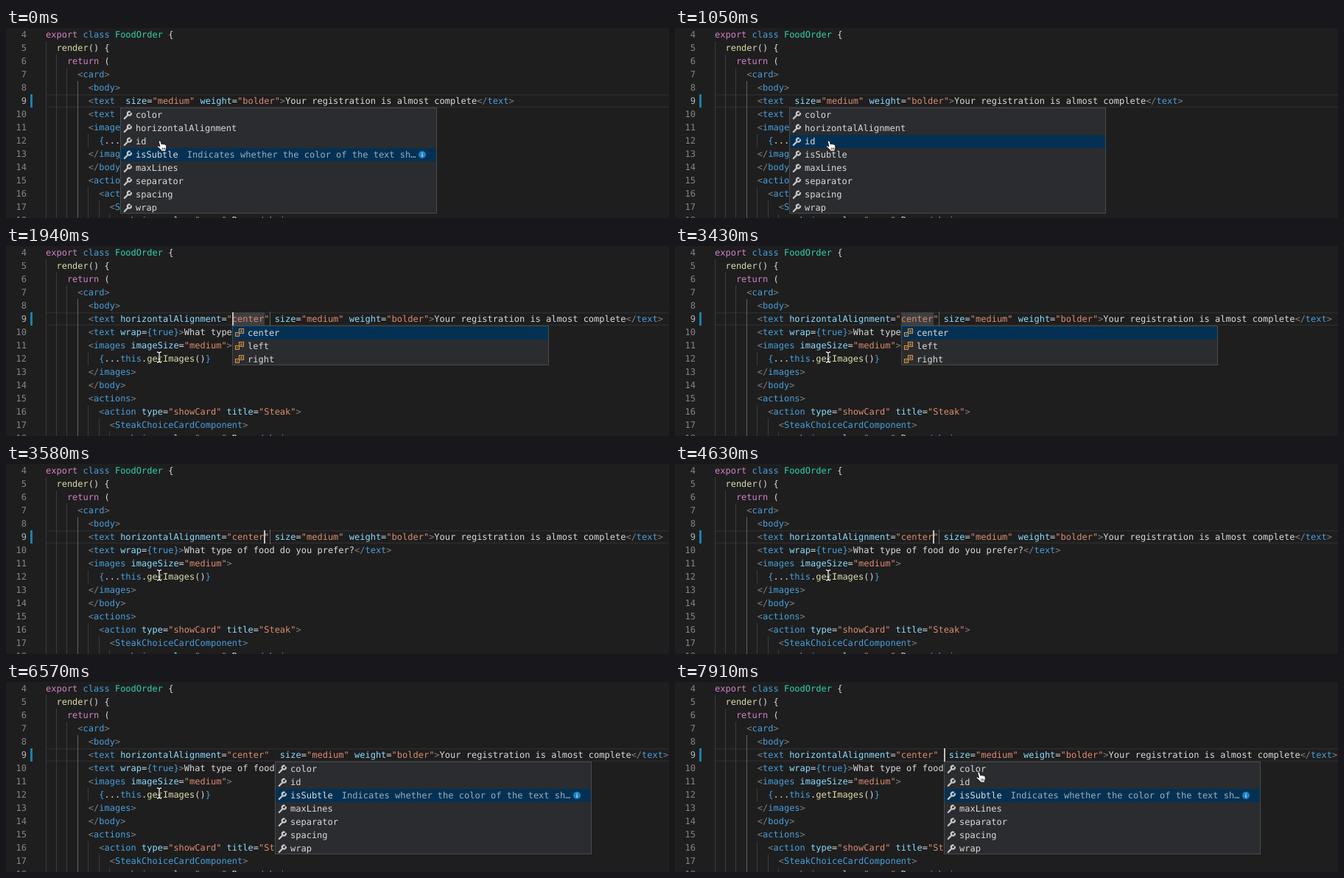
Animation, 900 px wide and 258 px high, one loop 8 s. Source, as an HTML page with a canvas:

```html
<!DOCTYPE html>
<html lang="en">
<head>
<meta charset="utf-8">
<title>Editor completion</title>
<style>
html, body { margin: 0; width: 100%; height: 100%; overflow: hidden; background: #1e1e1e; }
canvas { display: block; }
</style>
</head>
<body>
<canvas id="stage" width="900" height="258"></canvas>
<script>
const ctx = document.getElementById('stage').getContext('2d');
const LOOP = 8000, ROW = 18, LEFT = 54, CELL = 12 * 0.602;
const TEXT = '#dadada', GREY = '#808080', BLUE = '#489fdc';

const RULES = [
  [/\b(export|return)\b/, '#d081c8'],
  [/\bclass\b|\bthis\b|\btrue\b|\{(?=true|\.)|(?<=true|\(\))\}/, BLUE],
  [/FoodOrder/, '#2fd0ae'],
  [/\w+(?=\()/, '#dcdcaa'],
  [/<\/?|>/, GREY],
  [/(?<=<\/?)\w+/, BLUE],
  [/\w+(?==)/, '#8cdcfe'],
  [/"[^"]*"/, '#dd8b70']
];
const LEXER = new RegExp(RULES.map(([r], i) => `(?<r${i}>${r.source})`).join('|'), 'g');

const FIRST_LINE = 4, EDIT_LINE = 9;
const CODE = [
  [0, 'export class FoodOrder {'],
  [1, 'render() {'],
  [2, 'return ('],
  [3, '<card>'],
  [4, '<body>'],
  [4, ''],
  [4, '<text wrap={true}>What type of food do you prefer?</text>'],
  [4, '<images imageSize="medium">'],
  [5, '{...this.getImages()}'],
  [4, '</images>'],
  [4, '</body>'],
  [4, '<actions>'],
  [5, '<action type="showCard" title="Steak">'],
  [6, '<SteakChoiceCardComponent>'],
  [7, '<choice value="rare">Rare</choice>']
];

const SUBTLE = 'Indicates whether the color of the text sh…';
const ALIGN = 'Controls how Items are horizont…';
const PROPS = ['color', 'horizontalAlignment', 'id', 'isSubtle', 'maxLines', 'separator', 'spacing', 'wrap'];
const PROPS_LEFT = PROPS.filter(name => name !== 'horizontalAlignment');

// Step tables: the last entry whose time has passed applies.
const EDITS = [[0, ''], [1940, 'horizontalAlignment="center"'], [5670, 'horizontalAlignment="center" ']];
const POPUPS = [
  [0, { x: 155, items: PROPS, pick: 3, detail: SUBTLE }],
  [1050, { x: 155, items: PROPS, pick: 2 }],
  [1200, { x: 155, items: PROPS, pick: 1, detail: ALIGN }],
  [1940, { x: 307, items: ['center', 'left', 'right'], pick: 0, values: true }],
  [3580, null],
  [6570, { x: 365, items: PROPS_LEFT, pick: 2, detail: SUBTLE }]
];
const CARETS = [
  [0, 0], [300, 155], [750, 0], [1350, 155], [1790, 0],
  [1940, 307], [2390, 0], [2830, 307], [3430, 0],
  [3580, 350], [4030, 0], [4630, 350], [5080, 358], [5520, 0],
  [5670, 365], [6120, 0], [6720, 365], [7170, 0], [7760, 365]
];
const POINTERS = [
  [0, { x: 208, y: 152, hand: true }],
  [1940, { x: 208, y: 151 }],
  [7320, { x: 219, y: 163 }],
  [7470, { x: 262, y: 169 }],
  [7620, { x: 338, y: 158 }],
  [7760, { x: 394, y: 134, hand: true }],
  [7910, { x: 411.5, y: 121, hand: true }]
];

const at = (steps, t) => steps.findLast(([start]) => t >= start)[1];
const baseline = line => 13 + (line - FIRST_LINE) * ROW;

function rect(x, y, w, h, color) {
  ctx.fillStyle = color;
  ctx.fillRect(x, y, w, h);
}

function write(text, x, y, color) {
  ctx.fillStyle = color;
  ctx.fillText(text, x, y);
}

function stroke(path, color, width) {
  ctx.strokeStyle = color;
  ctx.lineWidth = width;
  ctx.stroke(path);
}

function drawCode(text, x, y) {
  let done = 0;
  const put = (part, start, color) => write(part, x + start * CELL, y, color);
  for (const m of text.matchAll(LEXER)) {
    put(text.slice(done, m.index), done, TEXT);
    const rule = RULES.findIndex((_, i) => m.groups['r' + i] !== undefined);
    put(m[0], m.index, RULES[rule][1]);
    done = m.index + m[0].length;
  }
  put(text.slice(done), done, TEXT);
}

function drawEditor(t) {
  rect(0, 0, 900, 258, '#1e1e1e');
  rect(LEFT, 90, 846, 1.5, '#2b2b2b');
  rect(LEFT, 106.5, 846, 1.5, '#2b2b2b');
  rect(33, 90, 3, ROW, '#1b81a8');
  if (t >= 1940 && t < 3580) rect(307, 90, 44, ROW, '#3d3f42');
  if (t >= 1940 && t < 5080) rect(358, 89, 1, 20, '#626262');

  CODE.forEach(([depth, text], i) => {
    const line = FIRST_LINE + i, y = baseline(line);
    for (let d = 0; d < depth; d++) {
      rect(Math.floor(LEFT + d * 2 * CELL), i * ROW, 1, ROW, d === 3 ? '#626262' : '#3c3c3c');
    }
    const label = String(line);
    write(label, 28 - label.length * CELL, y, line === EDIT_LINE ? '#b4b4b4' : '#858585');
    if (line === EDIT_LINE) {
      text = `<text ${at(EDITS, t)} size="medium" weight="bolder">Your registration is almost complete</text>`;
    }
    drawCode(text, LEFT + depth * 2 * CELL, y);
  });
  const caret = at(CARETS, t);
  if (caret) rect(caret, 90, 2, ROW, '#c0c0be');
}

function drawWrench(x, y) {
  const shape = new Path2D();
  shape.moveTo(x + 1.8, y + 11);
  shape.lineTo(x + 6.4, y + 6.2);
  shape.arc(x + 8.4, y + 4.2, 2.5, Math.PI * 0.75, Math.PI * 1.55);
  shape.moveTo(x + 6.4, y + 6.2);
  shape.arc(x + 8.4, y + 4.2, 2.5, Math.PI * 0.75, -Math.PI * 0.05, true);
  ctx.lineCap = 'round';
  stroke(shape, '#c8c8c8', 2.3);
  ctx.lineCap = 'butt';
}

function drawValueIcon(x, y) {
  const shape = new Path2D();
  shape.rect(x + 5.5, y + 0.5, 6, 6);
  shape.rect(x + 0.5, y + 5.5, 5, 5);
  shape.moveTo(x + 7, y + 2.7);
  shape.lineTo(x + 10, y + 2.7);
  shape.moveTo(x + 7, y + 4.5);
  shape.lineTo(x + 10, y + 4.5);
  shape.moveTo(x + 2, y + 8);
  shape.lineTo(x + 4, y + 8);
  stroke(shape, '#dc9746', 1.1);
}

function drawInfo(x, y) {
  ctx.fillStyle = '#1c83c4';
  ctx.beginPath();
  ctx.arc(x, y, 5, 0, Math.PI * 2);
  ctx.fill();
  rect(x - 0.6, y - 3, 1.2, 1.3, '#d5e8f4');
  rect(x - 0.6, y - 0.8, 1.2, 3.8, '#d5e8f4');
}

function drawPopup({ x, items, pick, detail, values }) {
  const width = 430, height = items.length * ROW;
  rect(x, 108, width, height, '#2b2c2f');
  items.forEach((name, i) => {
    const top = 109 + i * ROW, y = top + 13;
    if (i === pick) rect(x + 1, top, width - 2, ROW, '#043153');
    if (values) drawValueIcon(x + 4, top + 3);
    else drawWrench(x + 4, top + 3);
    write(name, x + 21, y, TEXT);
    if (i === pick && detail) {
      write(detail, x + 33 + name.length * CELL, y, '#9badbb');
      drawInfo(x + 410, top + 9);
    }
  });
  ctx.strokeStyle = '#4a4a4a';
  ctx.lineWidth = 1;
  ctx.strokeRect(x + 0.5, 108.5, width - 1, height - 1);
}

const HAND = new Path2D(`M2.2 1.8 Q3.8 .2 5 1.9 L6.2 6 Q7.4 4.8 8.4 6 Q9.6 5 10.5 6.4
  Q12 5.7 12.4 7.3 Q13.5 10.6 12.2 12.8 L11.8 15.2 L6.4 15.2 Q5.5 13 1 9.8
  Q-.2 8.2 1.5 7.8 L4 9 Z`);
const FINGERS = new Path2D('M7.2 10.5 V13.3 M8.9 10.5 V13.3 M10.6 10.5 V13.3');
const BEAM = new Path2D('M-3 -7 Q0 -7 0 -5 V5 Q0 7 -3 7 M3 -7 Q0 -7 0 -5 M0 5 Q0 7 3 7 M-1.5 2.5 H1.5');

function drawPointer({ x, y, hand }) {
  ctx.save();
  ctx.translate(x - (hand ? 3 : 0), y);
  if (hand) {
    ctx.fillStyle = '#fff';
    ctx.fill(HAND);
    stroke(HAND, '#111', 0.9);
    stroke(FINGERS, '#222', 0.8);
  } else {
    stroke(BEAM, '#111', 2.6);
    stroke(BEAM, '#f2f2f2', 1.3);
  }
  ctx.restore();
}

function render() {
  const t = performance.now() % LOOP;
  ctx.font = '12px "DejaVu Sans Mono", monospace';
  ctx.textRendering = 'geometricPrecision';
  drawEditor(t);
  const popup = at(POPUPS, t);
  if (popup) drawPopup(popup);
  drawPointer(at(POINTERS, t));
  requestAnimationFrame(render);
}
render();
</script>
</body>
</html>
```
